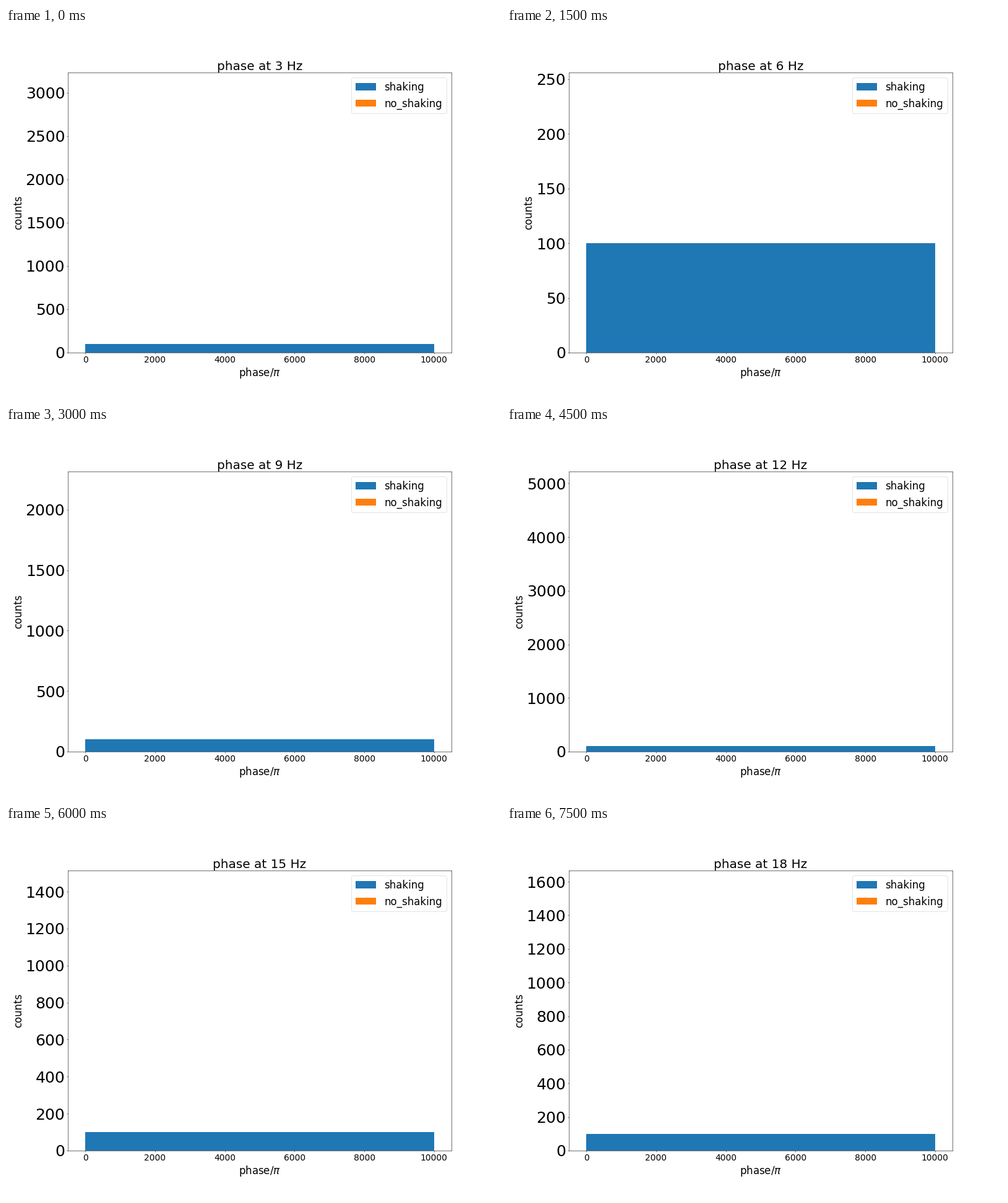
Animation of 800 by 600 pixels, one loop 8000 ms. Source, as a matplotlib script:

```python
import matplotlib.pyplot as plt
from matplotlib.animation import FuncAnimation

plt.rcParams.update({
    "font.family": "DejaVu Sans",
    "font.size": 24,
    "axes.titlesize": "large",
    "xtick.labelsize": 20,
    "ytick.labelsize": 36,
})

STEP_MS = 500
STEPS = 16
HOLD = 3       # steps each histogram stays on screen
HZ_STEP = 3    # frequency added per histogram
HEADROOM = 1.05

# Highest count at each frequency; it sets the height of the y axis
PEAKS = [3078, 244, 2206, 4976, 1442, 1587]

fig, ax = plt.subplots(figsize=(16, 12), dpi=50, facecolor="white")
fig.subplots_adjust(left=0.125, right=0.9, bottom=0.125, top=0.88)

# A uniform histogram: 100 counts in every bin from 0 to 10000
ax.bar(0, 100, width=10000, align="edge", label="shaking")
ax.bar(0, 0, width=0, align="edge", label="no_shaking")

ax.set_xlim(-500, 10500)
ax.set_xlabel(r"phase/$\pi$")
ax.set_ylabel("counts")
ax.legend(loc="upper right")


def draw(step):
    stage = step // HOLD
    ax.set_title(f"phase at {HZ_STEP * (stage + 1)} Hz")
    ax.set_ylim(0, PEAKS[stage] * HEADROOM)
    return []


def reset():
    return draw(0)


anim = FuncAnimation(fig, draw, frames=STEPS, init_func=reset,
                     interval=STEP_MS, repeat=True, repeat_delay=0, blit=False)

plt.show()
```
